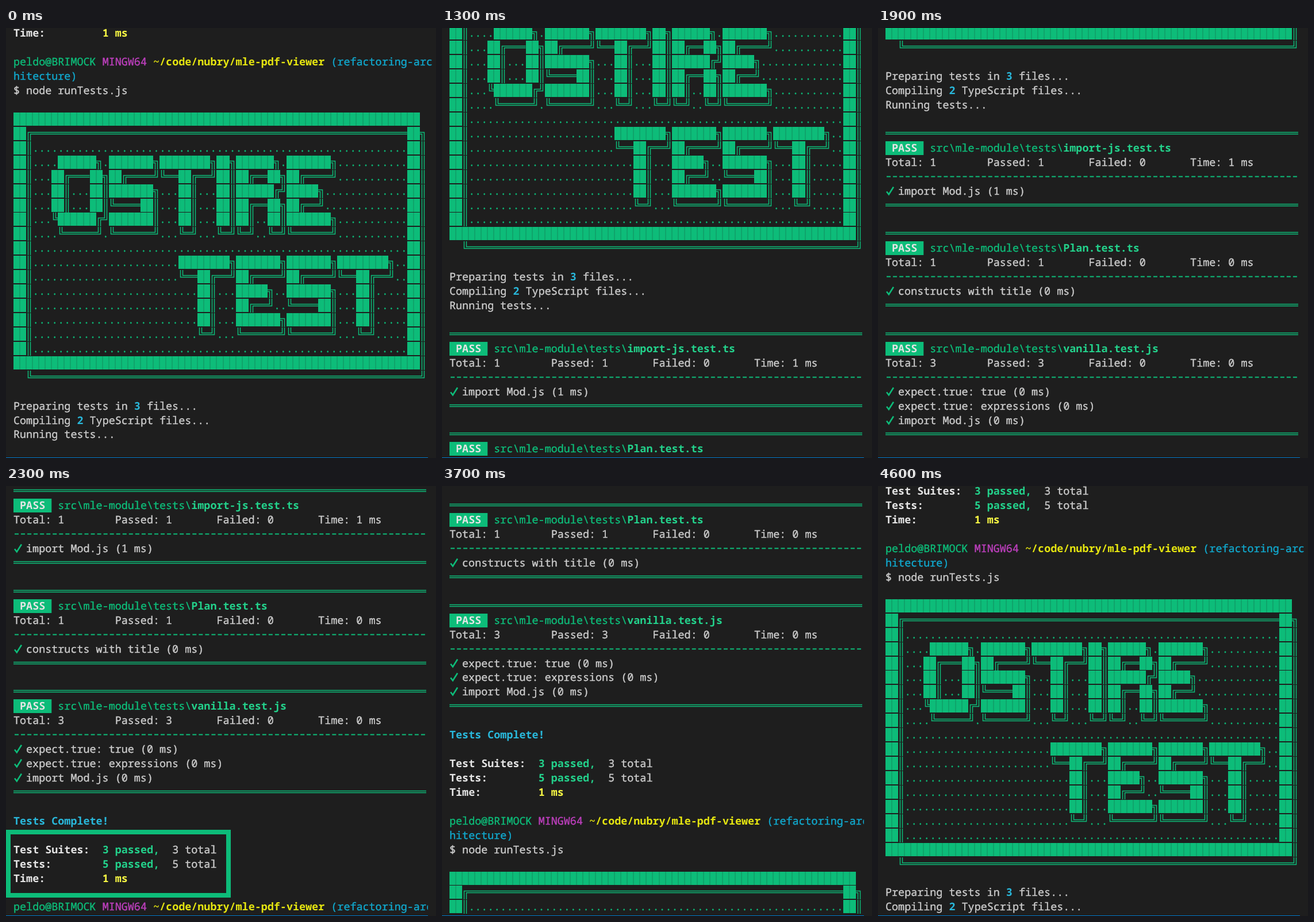
An HTML page for the animation above (5.1 s loop, 748 by 748 pixels).

```html
<!DOCTYPE html>
<html lang="en">
<head>
<meta charset="utf-8">
<title>Test runner terminal</title>
<style>
  html, body { margin: 0; width: 100%; height: 100%; overflow: hidden; background: #1e1e1e; }
  svg { display: block; width: 100%; height: 100%; }
  text {
    font: 18.41px "Noto Sans Mono", "DejaVu Sans Mono", monospace;
    white-space: pre;
    text-rendering: geometricPrecision;
    color: #ccc;
    fill: currentColor;
    stroke: currentColor;
    stroke-width: .4;
  }
  .green { color: #0dbc79; }
  .magenta { color: #bc3fbc; }
  .yellow { color: #e5e510; }
  .cyan { color: #11a8cd; }
  .white { color: #e5e5e5; }
  .lime { color: #23d18b; }
  .sky { color: #29b8db; }
  .gold { color: #f5f543; }
  .yellow, .white, .lime, .sky, .gold { font-weight: 700; stroke: none; }
  .solid { fill: #0dbc79; }
  .stroke { fill: none; stroke: #0dbc79; }
  .seam { fill: none; stroke: #1e1e1e; opacity: .3; }
</style>
</head>
<body>
<svg viewBox="0 0 748 748">
  <g id="screen"></g>
  <rect id="edge" x="734" width="14" height="748" fill="#1e1e1e"/>
  <rect y="747" width="734" height="1" fill="#007acc"/>
  <rect id="highlight" class="stroke" x="4" y="602" width="383" height="110" stroke-width="8"/>
</svg>
<script>
const LEFT = 13, CELL = 11.046, PITCH = 24.93, ROWS = 30, WIDTH = 65;
const BASELINE = 18, MID = 11, BLOCK = 23;
const colX = col => LEFT + col * CELL;
const rowY = row => Math.round(row * PITCH - 2.6);

function add(parent, tag, attrs, content = '') {
  const el = document.createElementNS('http://www.w3.org/2000/svg', tag);
  for (const name in attrs) el.setAttribute(name, attrs[name]);
  el.textContent = content;
  return parent.appendChild(el);
}

// Banner lettering, six rows per letter
const letters = {
  O: [' ██████╗ ', '██╔═══██╗', '██║   ██║', '██║   ██║', '╚██████╔╝', ' ╚═════╝ '],
  S: ['███████╗', '██╔════╝', '███████╗', '╚════██║', '███████║', '╚══════╝'],
  T: ['████████╗', '╚══██╔══╝', '   ██║   ', '   ██║   ', '   ██║   ', '   ╚═╝   '],
  I: ['██╗', '██║', '██║', '██║', '██║', '╚═╝'],
  R: ['██████╗ ', '██╔══██╗', '██████╔╝', '██╔══██╗', '██║  ██║', '╚═╝  ╚═╝'],
  E: ['███████╗', '██╔════╝', '█████╗  ', '██╔══╝  ', '███████╗', '╚══════╝']
};

const framed = inner => '██║' + inner.padEnd(59).replaceAll(' ', '.') + '██║';
const lettering = (word, indent) => letters.O.map((_, i) =>
  framed(' '.repeat(indent) + [...word].map(ch => letters[ch][i]).join('')));

const banner = [
  '█'.repeat(64),
  '██╔' + '═'.repeat(59) + '██╗',
  framed(''), ...lettering('OSTIRE', 3),
  framed(''), ...lettering('TEST', 23),
  framed(''),
  '█'.repeat(64) + '║',
  '  ╚' + '═'.repeat(61) + '╝'
];

// Each line is a function that draws into its own group
const blank = () => {};

const text = (...runs) => group => {
  let col = 0;
  for (const [content, style = ''] of runs) {
    add(group, 'text', { x: colX(col), y: BASELINE, class: style }, content);
    col += content.length;
  }
};

// Double-line box characters: sides reached by each one
const sides = { '═': 'lr', '║': 'tb', '╔': 'rb', '╗': 'lb', '╚': 'rt', '╝': 'lt' };

function boxPath(ch, col) {
  const l = colX(col), r = colX(col + 1), cx = Math.floor((l + r) / 2) + .5;
  const reach = sides[ch], dx = 2, dy = 1.5;
  return [-1, 1].map(s => {
    if (reach === 'lr') return `M${l} ${MID + s * dy}H${r}`;
    if (reach === 'tb') return `M${cx + s * dx} 0V24`;
    const [h, v] = reach;
    const y = MID + s * dy;
    const x = cx + dx * s * ((h === 'r') === (v === 'b') ? 1 : -1);
    return `M${h === 'l' ? l : r} ${y}H${x}V${v === 't' ? 0 : 24}`;
  }).join('');
}

const art = line => group => {
  let blocks = '', seams = '', boxes = '';
  [...line].forEach((ch, col) => {
    if (ch === '█') {
      const x = Math.round(colX(col)), end = Math.round(colX(col + 1));
      blocks += `M${x} 0H${end}V${BLOCK}H${x}Z`;
      if (line[col + 1] === '█') seams += `M${end} 0V${BLOCK}`;
    } else if (sides[ch]) boxes += boxPath(ch, col);
  });
  add(group, 'path', { d: blocks, class: 'solid' });
  add(group, 'path', { d: seams, class: 'seam' });
  add(group, 'path', { d: boxes, class: 'stroke', 'stroke-width': 1.5 });
  for (const dots of line.matchAll(/\.+/g))
    add(group, 'text', { x: colX(dots.index), y: BASELINE, class: 'green' }, dots[0]);
};

const rule = art('═'.repeat(WIDTH));

const dashes = group => add(group, 'path', {
  d: `M${LEFT + 2} 11.5H${colX(WIDTH)}`, class: 'stroke',
  'stroke-width': 1.8, 'stroke-dasharray': `7 ${CELL - 7}`
});

const badge = file => group => {
  add(group, 'rect', { x: LEFT, y: 0, width: 6 * CELL, height: 24, class: 'solid' });
  text([' PASS ', 'white'], [' '], ['src\\mle-module\\tests\\', 'green'], [file, 'lime'])(group);
};

const check = label => group => {
  add(group, 'path', { d: 'M15 12.5L18.8 17.5L27 4.5', class: 'stroke', 'stroke-width': 2.6 });
  text(['  '], [label])(group);
};

const suite = (file, time, ...tests) => [
  rule,
  badge(file),
  text([[`Total: ${tests.length}`, `Passed: ${tests.length}`, 'Failed: 0', `Time: ${time} ms`]
    .map(part => part.padEnd(16)).join('')]),
  dashes,
  ...tests.map(check),
  rule,
  blank
];

const total = (label, count) => text(
  [label.padEnd(14), 'white'], [`${count} passed,  `, 'lime'], [`${count} total`]);

const lines = [
  text(['peldo@BRIMOCK ', 'green'], ['MINGW64 ', 'magenta'],
    ['~/code/nubry/mle-pdf-viewer ', 'yellow'], ['(refactoring-arc', 'cyan']),
  text(['hitecture)', 'cyan']),
  text(['$ node runTests.js']),
  blank,
  ...banner.map(art),
  blank,
  text(['Preparing tests in '], ['3', 'sky'], [' files...']),
  text(['Compiling '], ['2', 'sky'], [' TypeScript files...']),
  text(['Running tests...']),
  blank,
  ...suite('import-js.test.ts', 1, 'import Mod.js (1 ms)'),
  ...suite('Plan.test.ts', 0, 'constructs with title (0 ms)'),
  ...suite('vanilla.test.js', 0, 'expect.true: true (0 ms)',
    'expect.true: expressions (0 ms)', 'import Mod.js (0 ms)'),
  text(['Tests Complete!', 'sky']),
  blank,
  total('Test Suites:', 3),
  total('Tests:', 5),
  text(['Time:'.padEnd(14), 'white'], ['1 ms', 'gold']),
  blank
];

const screen = document.getElementById('screen');
const groups = lines.map(draw => {
  const group = add(screen, 'g', {});
  draw(group);
  return group;
});

// Top line of the screen; each scroll advances every 100 ms, then rests
const LOOP = 5100, STEP = 100, REST_TOP = 55;
const scrolls = [
  { start: 1000, tops: [0, 2, 5, 7, 10, 12, 15, 17, 19, 21, 23, 24, 26, 28] },
  { start: 3300, tops: [30, 31, 32, 33, 34, 35, 36, 38, 40, 42, 45, 48, 51, 53] }
];

function topAt(time) {
  const scroll = scrolls.findLast(s => time >= s.start);
  if (!scroll) return REST_TOP;
  const index = Math.floor((time - scroll.start) / STEP);
  return scroll.tops[Math.min(index, scroll.tops.length - 1)];
}

const show = (el, visible) => el.setAttribute('visibility', visible ? 'visible' : 'hidden');
const edge = document.getElementById('edge');
const highlight = document.getElementById('highlight');

function render(time) {
  const top = topAt(time);
  groups.forEach((group, i) => {
    const row = (i - top + lines.length) % lines.length;
    show(group, row < ROWS);
    group.setAttribute('transform', `translate(0 ${rowY(row)})`);
  });
  show(highlight, time >= 2300 && time < 3300);
  show(edge, time >= 2300 && time < 4600);
}

const began = performance.now();
function tick() {
  render((performance.now() - began) % LOOP);
  requestAnimationFrame(tick);
}
tick();
</script>
</body>
</html>
```
